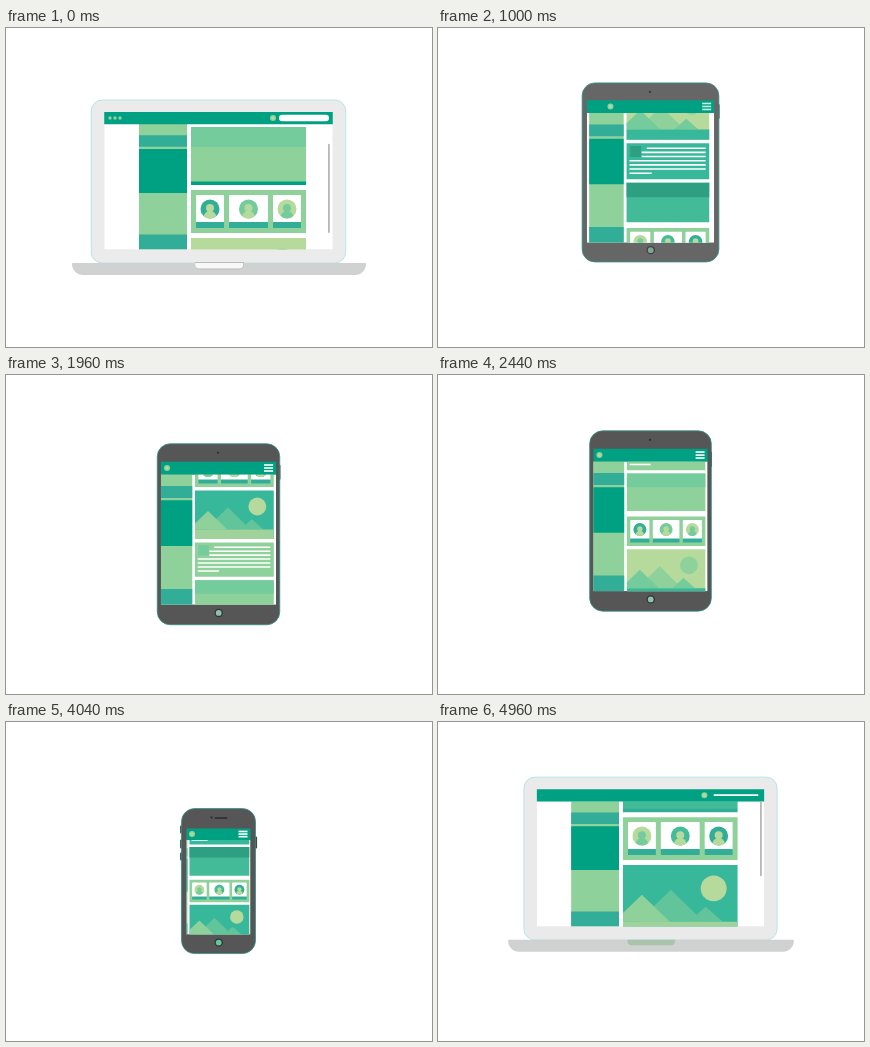
Recreate the animation shown at these times as an HTML page with a canvas. Size 426x319 px, loop 5000 ms.

```html
<!DOCTYPE html>
<html lang="en">
<head>
<meta charset="utf-8">
<title>Responsive page on three devices</title>
<style>
html, body { margin: 0; width: 100%; height: 100%; overflow: hidden; background: #fff; }
canvas { display: block; width: 426px; height: 319px; }
</style>
</head>
<body>
<canvas width="426" height="319"></canvas>
<script>
const c = document.querySelector('canvas').getContext('2d');
const LOOP = 5000, STEP = 40, MID = 212.5;
const DARK = '#00a182', DEEP = '#2f9f82', TEAL = '#38b89a', AQUA = '#32ae98',
      MINT = '#74cb9b', GREEN = '#8fd19b', LIME = '#b5da9c';

const laptop = { w: 254.5, top: 72, h: 163, r: 11, side: 13, above: 12, below: 13.5, bar: 12, k: 1, x: 185, icon: 267, grey: 235 };
const tablet = { w: 122.5, top: 73, h: 181, r: 13, side: 3.7, above: 18, below: 20, bar: 12.5, k: .685, x: 189, icon: 161, grey: 86 };
const phone  = { w: 74, top: 90, h: 145, r: 13, side: 5, above: 20, below: 19, bar: 11, k: .52, x: 183.5, icon: 186, grey: 86 };

// [time, value] keys
const bobKeys = [[0, 0], [400, -3], [560, -16], [620, -18], [1080, -18], [1180, -20], [1360, 0], [1400, -1],
  [1680, -2.5], [2240, -6], [2440, -17.5], [3200, -18], [3350, 0], [3920, -3], [4080, -3.5], [4320, -20], [4960, -17]];
const scrollKeys = [[0, -3], [510, 144.5], [1310, 144.5], [2440, 466], [3120, 466], [4270, 773], [5000, 773]];

const lerp = (a, b, p) => a + (b - a) * p;
const clamp = x => Math.min(1, Math.max(0, x));
const smooth = x => x * x * (3 - 2 * x);
const quad = x => x < .5 ? 2 * x * x : 1 - 2 * (1 - x) ** 2;
const ramp = (t, a, b, ease = smooth) => ease(clamp((t - a) / (b - a)));
const blend = (a, b, p) => Object.fromEntries(Object.keys(a).map(n => [n, lerp(a[n], b[n], p)]));

function track(keys, t, ease) {
  const i = keys.findIndex(key => key[0] > t);
  if (i < 0) return keys[keys.length - 1][1];
  const [a, b] = [keys[i - 1], keys[i]];
  return lerp(a[1], b[1], ramp(t, a[0], b[0], ease));
}

function rect(x, y, w, h, color, r = 0) {
  if (w <= 0 || h <= 0) return;
  c.fillStyle = color;
  c.beginPath();
  c.roundRect(x, y, w, h, r);
  c.fill();
}
function disc(x, y, r, color) {
  c.fillStyle = color;
  c.beginPath();
  c.arc(x, y, Math.max(0, r), 0, 7);
  c.fill();
}
function peak(x, y, half, color) {
  c.fillStyle = color;
  c.beginPath();
  c.moveTo(Math.max(0, x - half), 57);
  if (x < half) c.lineTo(0, y + (57 - y) * x / half);
  c.lineTo(x, y);
  c.lineTo(x + half, 57);
  c.fill();
}
function person(x, y, r, back, front) {
  disc(x, y, r, back);
  c.save();
  c.clip();
  disc(x, y + r * .85, r * .66, front);
  disc(x, y - r * .1, r * .42, front);
  c.restore();
}

// Page blocks, drawn at full size; pale chooses the colour scheme
function hero(pale, wide) {
  rect(0, 0, 115, 55, pale ? GREEN : '#43bb99');
  rect(0, 0, 115, 20, pale ? MINT : DEEP);
  if (wide) rect(0, 54.5, 115, 3.5, pale ? DARK : AQUA);
}
function cards(pale) {
  rect(0, 0, 115, 43, GREEN);
  const backs = pale ? [AQUA, MINT, LIME] : [LIME, '#45bb99', AQUA];
  const fronts = pale ? [LIME, LIME, MINT] : [MINT, LIME, LIME];
  [[5, 28], [38, 39], [82, 28]].forEach(([x, w], i) => {
    rect(x, 5, w, 28, '#fff', 1);
    rect(x, 32, w, 6, AQUA);
    person(x + w / 2, 19, 9.5, backs[i], fronts[i]);
  });
}
function mountains(pale) {
  rect(0, 0, 115, 71, pale ? LIME : TEAL);
  disc(91, 23.5, 13, pale ? GREEN : LIME);
  peak(48, 25, 33, pale ? GREEN : '#62c49b');
  peak(83, 42, 17, pale ? MINT : '#62c49b');
  peak(19, 30, 28, pale ? MINT : GREEN);
  rect(0, 57, 115, 14, pale ? TEAL : '#9fd39b');
}
function article(pale) {
  rect(0, 0, 115, 50, pale ? GREEN : TEAL);
  rect(5, 4, 15, 15, pale ? MINT : DEEP);
  [28, 21, 21, 4, 4, 4, 4].forEach((x, i) => rect(x, 5.8 + i * 5.8, (i < 6 ? 110 : 35) - x, 2.2, '#fff'));
}
const blocks = [[hero, 63], [cards, 48], [mountains, 76], [article, 55]];
const PAGE = 2 * blocks.reduce((sum, block) => sum + block[1], 0);

function page(d, left, top, width, height, scroll) {
  c.save();
  c.beginPath();
  c.rect(left, top, width, height);
  c.clip();
  rect(left, top, width, height, '#fff');
  const sideX = d.x - 52 * d.k, sideW = 48 * d.k;
  rect(sideX, top, sideW, height, GREEN);
  [[.09, .182, AQUA], [.2, .55, DARK], [.88, 1, AQUA]].forEach(([a, b, color]) =>
    rect(sideX, top + a * height, sideW, (b - a) * height, color));
  c.translate(d.x, top);
  c.scale(d.k, d.k);
  let y = -PAGE - scroll % PAGE;
  for (let i = 0; i < 24; i++) {
    const [draw, size] = blocks[i % 4];
    if (y > -size && y < height / d.k) {
      c.save();
      c.translate(0, y);
      draw(i % 8 < 4 !== (draw === article), d.k > .85);
      c.restore();
    }
    y += size;
  }
  c.restore();
}

function base(bottom, t) {
  const early = t < 2500;
  const open = early ? 1 - ramp(t, 500, 640) : ramp(t, 4800, 4980);
  const tuck = early ? ramp(t, 680, 800) : 1 - ramp(t, 4700, 4800);
  if (tuck >= 1) return;
  const w = lerp(55, 294, open), h = lerp(10, 12, open);
  const y = bottom - 4 * (1 - open) - 6 * tuck;
  rect(MID + .5 - w / 2, y, w, h, open > .3 ? '#d0d1d1' : '#dadada', [1, 1, 11, 11]);
  const nw = lerp(28, 48, open), nh = lerp(3, 6, open);
  if (open > .99) rect(189, y - 1, 49, 7.5, '#b9bbb9', [0, 0, 5, 5]);
  rect(MID + .7 - nw / 2, y, nw, nh - .5, early ? '#f8f8f8' : '#a9c4aa', [0, 0, 4, 4]);
}

function draw(t) {
  const toTablet = ramp(t, 570, 1130, quad), toPhone = ramp(t, 2380, 3020, quad), toLaptop = ramp(t, 4340, 5000, quad);
  const d = t < 2000 ? blend(laptop, tablet, toTablet)
    : t < 4000 ? blend(tablet, phone, toPhone) : blend(phone, laptop, toLaptop);
  const mobile = t < 2000 ? toTablet : 1 - toLaptop;
  const phoneness = toPhone * (1 - toLaptop);
  const scroll = track(scrollKeys, t, x => x);
  const top = d.top + track(bobKeys, t, smooth), bottom = top + d.h;
  const left = MID - d.w / 2, right = left + d.w;
  const body = `rgb(${d.grey},${d.grey},${d.grey})`;

  rect(0, 0, 426, 319, '#fff');

  // side buttons
  if (phoneness > .5) {
    [[17, 8], [31, 9], [44, 8]].forEach(([y, h]) => rect(left - 1.4, top + y, 3, h, '#404946', 1));
    rect(right - 1.4, top + 28, 3, 12, '#404946', 1);
  } else if (mobile > .8) rect(right - 1.6, top + 21, 2.3, 15, '#404946', 1);

  rect(left, top, d.w, d.h, body, d.r);
  c.strokeStyle = mobile > .5 ? '#2f9186' : '#a5e3e8';
  c.lineWidth = .8;
  c.stroke();
  base(bottom, t);

  // screen and header
  const sx = left + d.side, sy = top + d.above, sw = d.w - 2 * d.side;
  const px = sy + d.bar, ph = bottom - d.below - px, mid = sy + d.bar / 2;
  page(d, sx, px, sw, ph, scroll);
  rect(sx, sy, sw, d.bar + .3, DARK);
  disc(d.icon, mid, 3, GREEN);
  disc(d.icon, mid, 1.6, LIME);

  const pill = t < 2500 ? 1 - ramp(t, 520, 640) : ramp(t, 4930, 5020);
  if (pill > 0) {
    const h = 6.5 * pill, w = lerp(43, 50, pill);
    rect(298 - w / 2, mid - h / 2, w, h, '#fff', h / 2);
    [104, 109, 114].forEach((x, i) => disc(x, mid, (t < 2500 || !i) ? 1.7 * pill : 0, GREEN));
    const progress = t < 2500 ? .54 + scroll / 324 : 0;
    rect(322, px + 37 * progress, 1.8, Math.min(75 + 27 * progress, ph - 37 * progress), '#b4b8b6', 1);
  }

  if (mobile > .5) {
    c.globalAlpha = clamp(mobile * 2 - 1);
    for (let i = -1; i < 2; i++) rect(sx + sw - 12, mid + i * lerp(3, 2.6, phoneness) - .8, 9, 1.6, '#fff');
    const by = bottom - lerp(11.8, 11, phoneness);
    disc(MID + .2, by, 4.2, '#2e3734');
    disc(MID + .2, by, 2.9, phoneness > .5 ? '#65c69d' : '#94bfae');
    if (phoneness > .5) rect(MID - 4, top + 8.7, 13, 1.4, '#292d2c', 1);
    disc(phoneness > .5 ? MID - 7 : MID - .5, top + 9, 1.1, '#292d2c');
    c.globalAlpha = 1;
  }
}

const start = performance.now();
function frame() {
  const t = (performance.now() - start) % LOOP;
  draw(Math.floor(t / STEP) * STEP);
  requestAnimationFrame(frame);
}
frame();
</script>
</body>
</html>
```
